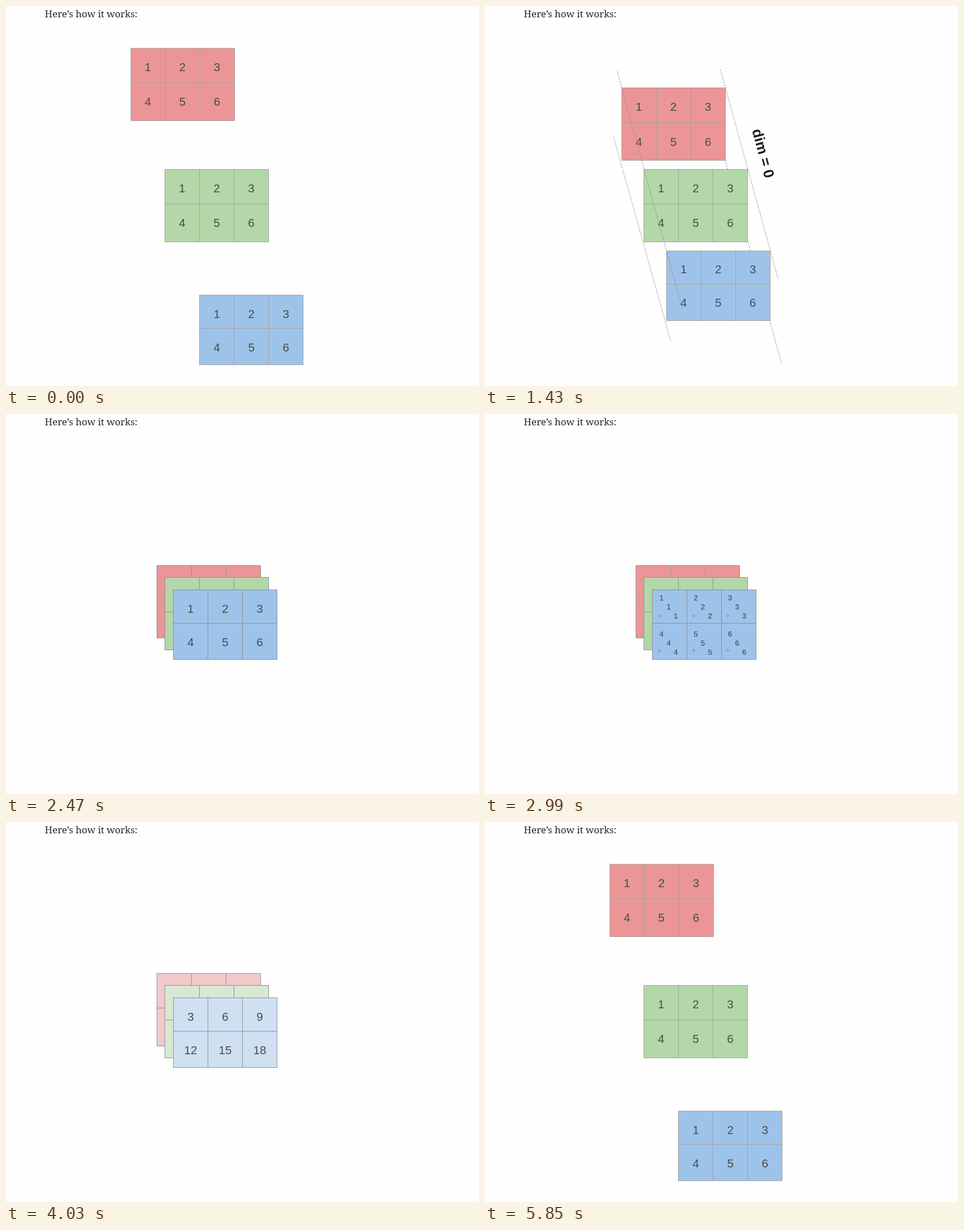
An HTML page that plays this animation: 835 by 671 pixels, repeating every 5.98 s.

```html
<!DOCTYPE html>
<html lang="en">
<head>
<meta charset="utf-8">
<title>Sum along a dimension</title>
<style>
html, body { margin: 0; width: 100%; height: 100%; overflow: hidden; background: #fefefe; }
svg { display: block; width: 835px; height: 671px; }
text { font-family: "Liberation Sans", Arial, sans-serif; fill: #4a4a4a; text-anchor: middle; }
.head { font-family: "Noto Serif", serif; font-size: 16.8px; fill: #262626; text-anchor: start; }
.num { font-size: 20.5px; }
.small { font-size: 13px; fill: #46525f; stroke: #46525f; stroke-width: .25; }
.plus { font-size: 13px; fill: #7d90a6; }
.dim { font-size: 25.5px; font-weight: bold; fill: #1c1c1c; }
.guide { stroke: #858585; stroke-width: 1; stroke-dasharray: 2.5 2; }
</style>
</head>
<body>
<svg viewBox="0 0 835 671">
  <text class="head" x="68.6" y="20">Here’s how it works:</text>
  <g id="scene"></g>
</svg>
<script>
const LOOP = 5980;
const STARTS = [0, 910, 1430, 1950, 2470, 2990, 3510, 4030, 4550, 5850];
const CELL = 61;
const ONES = [1, 2, 3, 4, 5, 6];
const SUMS = ONES.map(n => n * 3);
const FULL = ["#eb9597", "#b3d7a8", "#9ec3ea"];
const PALE = ["#f2c9cb", "#d7e9d2", "#cfe0f2"];
const SOFT = "#a5a29c", DARK = "#8d9296";
const GREEN = [280.5, 288.3];
const scene = document.getElementById("scene");

const text = (cls, x, y, s, extra = "") =>
  `<text class="${cls}" x="${x}" y="${y}" ${extra}>${s}</text>`;
const guide = (x1, y1, x2, y2) =>
  `<line class="guide" x1="${x1}" y1="${y1}" x2="${x2}" y2="${y2}"/>`;
const mix = (a, b, k) => a.map((v, i) => v + (b[i] - v) * k);

function card(pos, kind, fill, stroke, dash = "") {
  // half-pixel corners keep the hairlines one pixel wide
  const [x, y] = pos.map(v => Math.floor(v) + 0.5);
  const blue = kind === 2;
  const h = blue ? 123 : 128, mid = blue ? 59 : 61;
  const w = CELL * 3;
  return `<g stroke="${stroke}"><rect x="${x}" y="${y}" width="${w}" height="${h}" fill="${fill}"/>` +
    `<path stroke-dasharray="${dash}" d="M${x + CELL} ${y}v${h}M${x + CELL * 2} ${y}v${h}M${x} ${y + mid}h${w}"/></g>`;
}

function numbers([x, y], kind, list) {
  const drop = kind === 2 ? 59 : 61.7;
  return list.map((n, i) =>
    text("num", x + 30.5 + CELL * (i % 3), y + 40.2 + drop * Math.floor(i / 3), n)).join("");
}

// three stacked addends with a plus sign in each cell
function addends([x, y]) {
  return ONES.map((n, i) => {
    const cx = x + 60.4 * (i % 3), row = Math.floor(i / 3), cy = y + 64.3 * row;
    const digits = [0, 1, 2].map(k =>
      text("small", cx + 16.3 + 12.6 * k, cy + 18.5 + 15.8 * k, n)).join("");
    return digits + text("plus", cx + 12.5, y + 50 + 61.3 * row, "+");
  }).join("");
}

function apart(red, blue) {
  return [red, GREEN, blue].map((p, i) =>
    card(p, i, FULL[i], SOFT) + numbers(p, i, ONES)).join("");
}

// k runs from 0 (wide) to 1 (close)
function closing(k) {
  const red = mix([226.5, 93.2], [256, 196.5], k);
  const blue = mix([334, 483], [306.4, 381.5], k);
  const [ax, ay] = mix([223, 78], [244, 153], k);
  const right = mix([405, 73, 527, 518], [426, 151, 508, 446], k);
  const left = mix([217, 196, 337, 627], [237, 267, 319, 557], k);
  const tail = k < 1 ? [524, 633] : [501, 551];
  return guide(red[0] + 183, red[1] + 128, ...tail) +
    apart(red, blue) +
    guide(ax, ay, 349, 537) + guide(...right) + guide(...left) +
    text("dim", 0, 9, "dim = 0", 'transform="translate(491.5 260) rotate(75)"');
}

function stack(fills, inner, dash) {
  const red = [266, 267.7], blue = [295.4, 310.6];
  return card(red, 0, fills[0], DARK, dash) + card(GREEN, 1, fills[1], DARK) +
    card(blue, 2, fills[2], DARK) + inner(blue);
}

const wide = () => apart([220, 74.3], [341.7, 510.7]);
const total = p => numbers(p, 2, SUMS);
const steps = [
  wide,
  () => closing(0),
  () => closing(0.5),
  () => closing(1),
  () => stack(FULL, p => numbers(p, 2, ONES)),
  () => stack(FULL, addends, "2.5 1.5"),
  () => stack(FULL, total),
  () => stack(PALE, total),
  () => card(GREEN, 1, "#fefefe", "#a2a2a2") + numbers(GREEN, 1, SUMS),
  wide
];

let shown = -1, begin;
function frame(now) {
  begin ??= now;
  const t = (now - begin) % LOOP;
  const step = STARTS.findLastIndex(s => s <= t);
  if (step !== shown) {
    scene.innerHTML = steps[step]();
    shown = step;
  }
  requestAnimationFrame(frame);
}
scene.innerHTML = wide();
requestAnimationFrame(frame);
</script>
</body>
</html>
```
